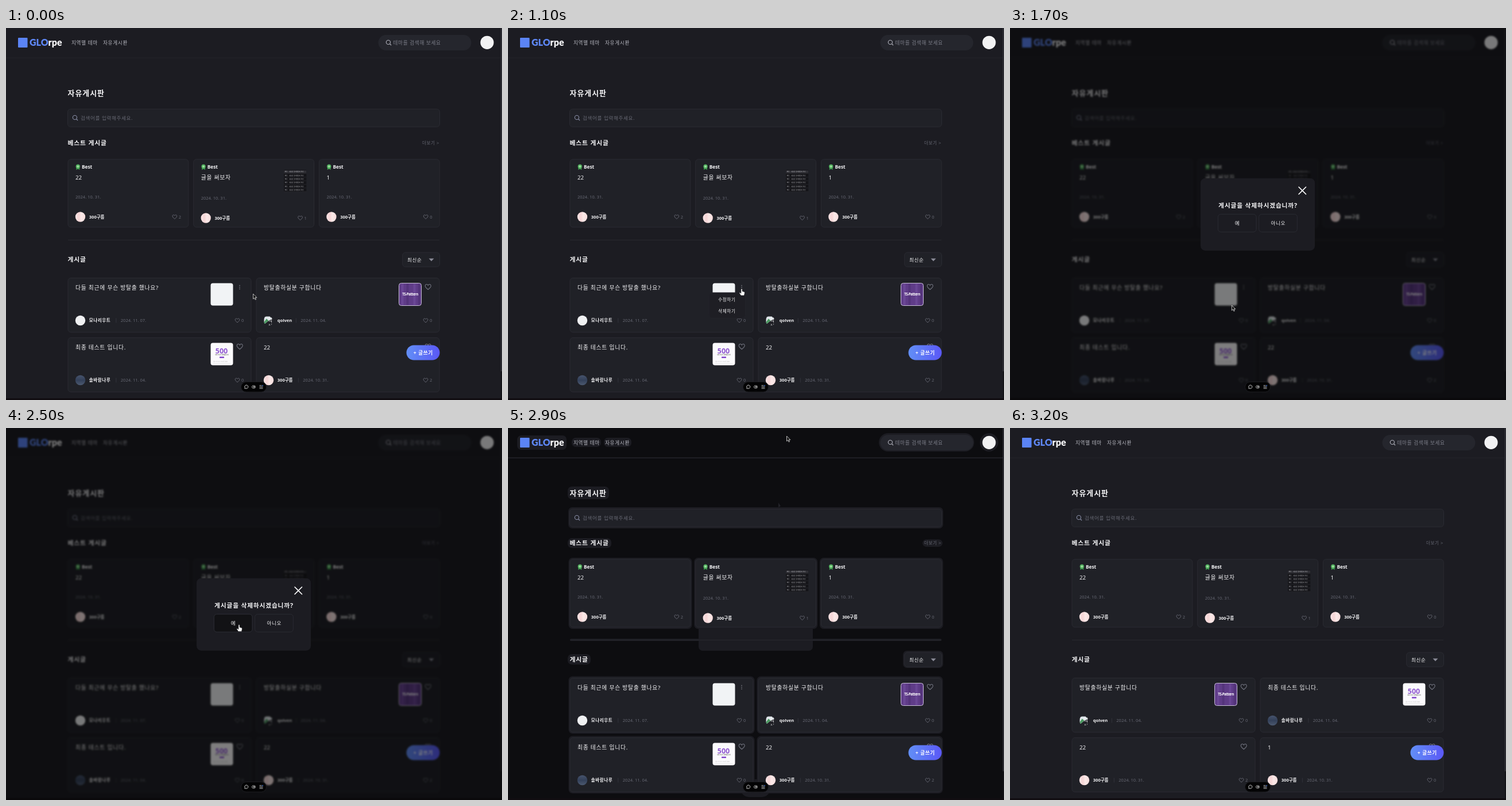
An HTML page for the animation above (3800 ms loop, 864x648 px).

```html
<!DOCTYPE html>
<html lang="ko">
<head>
<meta charset="utf-8">
<title>자유게시판</title>
<style>
  html, body { margin: 0; width: 100%; height: 100%; overflow: hidden; background: #0d0d10; }
  svg { display: block; width: 864px; height: 648px; }
  text { font-family: 'Noto Sans', 'Noto Sans CJK KR', 'Noto Sans CJK', sans-serif; white-space: pre; }
  .brand { font-family: Lato, sans-serif; }
  .dim { filter: blur(1.8px) brightness(.5); }
  .off { display: none; }
</style>
</head>
<body>
<svg id="stage" viewBox="0 0 864 648"></svg>
<script>
const BG = '#1c1c22', CARD = '#202127', EDGE = '#2a2b32', GREY = '#666873', WHITE = '#f4f4f6';
const LOOP = 3800;

const rect = (x, y, w, h, r, fill, more = '') =>
  `<rect x="${x}" y="${y}" width="${w}" height="${h}" rx="${r}" fill="${fill}" ${more}/>`;
const box = (x, y, w, h, r = 5, fill = CARD) => rect(x, y, w, h, r, fill, `stroke="${EDGE}"`);
const circle = (x, y, r, fill, more = '') => `<circle cx="${x}" cy="${y}" r="${r}" fill="${fill}" ${more}/>`;
const line = (d, color, width = 1, more = '') =>
  `<path d="${d}" fill="none" stroke="${color}" stroke-width="${width}" ${more}/>`;
const at = (x, y, body) => `<g transform="translate(${x} ${y})">${body}</g>`;
const group = (id, body) => `<g id="${id}">${body}</g>`;

// y is the vertical middle of the line; Hangul is set slightly open
function text(x, y, str, size, fill = WHITE, weight = 400, more = '') {
  const open = /[가-힣]/.test(str) && !/\d/.test(str) ? '.08em' : '0';
  return `<text x="${x}" y="${y + size * .37}" font-size="${size}" fill="${fill}" ` +
    `font-weight="${weight}" letter-spacing="${open}" ${more}>${str}</text>`;
}
const middle = 'text-anchor="middle"';

const heart = (x, y, w) => at(x, y, `<g transform="scale(${w / 10})">` +
  line('M0 4.4C-2.5 2.4-4.8.6-4.8-1.7C-4.8-4.6-1.4-5.2 0-2.7C1.4-5.2 4.8-4.6 4.8-1.7C4.8.6 2.5 2.4 0 4.4Z', '#757783', 1) + '</g>');
const lens = (x, y, color) => at(x, y, circle(-.6, -.6, 3.6, 'none', `stroke="${color}" stroke-width="1.1"`) +
  line('M2 2L4.6 4.6', color, 1.2));
const dots = (x, y) => [-3, 0, 3].map(d => circle(x, y + d, .8, '#8b8d98')).join('');

const USERS = {
  pink: { name: '300구름', width: 27.5, face: circle(0, 0, 8.7, 'url(#pink)') },
  runner: { name: '모나리우트', width: 38, face: circle(0, 0, 8.7, '#f0f1f3') },
  broken: {
    name: 'qolven', width: 23.5,
    face: '<g clip-path="url(#round)"><path d="M-8-7H2L6-3L-1 1L-8 7Z" fill="#dfe6ea"/>' +
      '<path d="M-8 3L-4-3L0 0L-8 7Z" fill="#4c9b62"/>' +
      text(-1.5, -1, '작', 9, WHITE) + text(-1.5, 10.5, '성', 9, WHITE) + '</g>'
  },
  slate: { name: '솔바람나루', width: 38, face: circle(0, 0, 8.7, 'url(#slate)') }
};

const THUMBS = {
  plain: rect(0, 0, 39, 39, 4, '#f1f3f5'),
  pattern: rect(0, 0, 39, 39, 4, '#5f3c88') +
    [4, 13, 25, 33].map((x, i) => rect(x, 1, 4, 37, 0, i % 2 ? '#54347b' : '#6b4796')).join('') +
    rect(0, 0, 39, 39, 4, 'none', 'stroke="#c9bfd8"') +
    text(19.5, 19, 'TS-Pattern', 6.2, '#fff', 700, middle + ' style="letter-spacing:-.5px"'),
  error: rect(0, 0, 39, 39, 4, '#fbfafc') + text(19, 13.5, '500', 12.5, '#8d55cf', 800, middle) +
    text(19.5, 20.5, '서버 오류가 발생했습니다', 2, '#555', 600, middle) +
    rect(15.5, 24, 8, 2.4, .6, '#8145cc') +
    text(5, 33, '잠시 후 다시 시도해 주세요', 2, '#aaa') +
    line('M4 36H35', '#ddd', .6)
};

const POSTS = [
  { title: '다들 최근에 무슨 방탈출 했나요?', user: 'runner', date: '2024. 11. 07.', likes: 0, thumb: 'plain', own: true },
  { title: '방탈출하실분 구합니다', user: 'broken', date: '2024. 11. 04.', likes: 0, thumb: 'pattern' },
  { title: '최종 테스트 입니다.', user: 'slate', date: '2024. 11. 04.', likes: 0, thumb: 'error' },
  { title: '22', user: 'pink', date: '2024. 10. 31.', likes: 2 },
  { title: '1', user: 'pink', date: '2024. 10. 31.', likes: 0 }
];
const SLOTS = [[108, 435.5], [436, 435.5], [108, 539.5], [436, 539.5]];
const BEST = [
  { x: 108, title: '22', likes: 2, drop: 0 },
  { x: 326.7, title: '글을 써보자', likes: 1, drop: 2, table: true },
  { x: 545.4, title: '1', likes: 0, drop: 0 }
];

function author(user, y) {
  const { name, face } = USERS[user];
  return at(21.5, y, face) + text(36.8, y, name, 7.5, WHITE, 600);
}
const likes = (right, y, n) => heart(right - 24, y, 8) + text(right - 17, y, n, 7.5, GREY);

function post({ title, user, date, likes: n, thumb, own }, [x, y]) {
  const end = 36.8 + USERS[user].width;
  return at(x, y, box(0, 0, 319, 94.5) + text(13, 17, title, 9.75, WHITE, 500) +
    (thumb ? at(248.5, 9, THUMBS[thumb]) : '') +
    (own ? dots(299, 16) : heart(299.2, 15.5, 10.5)) +
    author(user, 74) + line(`M${end + 9} 70V78`, '#34353d') +
    text(end + 17, 74, date, 7.5, GREY) + likes(319, 74, n));
}

function tableThumb() {
  const words = ['항목', '내용을 정리함', '결과 확인'];
  let out = rect(0, 0, 39, 38, 1, '#141418') + rect(0, 1, 39, 4.5, 0, '#303036');
  for (let row = 0; row < 6; row++) {
    const y = 3.3 + row * 6.3;
    words.forEach((word, i) => out += text([1.5, 9, 24][i], y, word, 2.4, '#c9c9ce', 500));
    out += line(`M0 ${y + 3}H39`, '#37373d', .5);
  }
  return out;
}

function best({ x, title, likes: n, drop, table }) {
  const ribbon = '<path d="M-2.6 1L-3 5.2L0 3.6L3 5.2L2.6 1Z" fill="#3f9b4f"/>' +
    circle(0, -.8, 3.6, '#55b562') + circle(0, -.8, 1.7, '#a7dfa6');
  return at(x, 228.7, box(0, 0, 209.8, 118.3) + at(17.3, 13.3, ribbon) +
    text(24, 13.3, 'Best', 8.3, WHITE, 700) + text(13, 32.2, title, 9.75, WHITE, 500) +
    text(13, 66 + drop, '2024. 10. 31.', 7.5, GREY) +
    (table ? at(157.5, 18.5, tableThumb()) : '') +
    author('pink', 100.3 + drop) + likes(209.8, 100.3 + drop, n));
}

// leftover patches of page colour around content while the backdrop is still dark
function patches() {
  const boxes = [
    [16, 13, 86, 25], [111, 17, 51, 16], [167, 17, 48, 16], [646, 9, 166, 32, 16], [822, 9, 32, 32, 16],
    [104, 102, 72, 22], [105, 138, 653, 37], [104, 192, 76, 17], [722, 194, 35, 13],
    [108, 367, 647, 4, 2], [332, 262, 199, 126], [104, 394, 40, 18], [688, 388, 70, 30],
    [405, 612, 52, 31, 15],
    ...BEST.map(b => [b.x - 2.5, 226, 215, 124]),
    ...SLOTS.map(([x, y]) => [x - 2.5, y - 3, 324, 100])
  ];
  const darkTop = rect(332, 255, 199, 93, 0, '#0d0d10');
  const [modal, rest] = [boxes[10], boxes.filter((_, i) => i !== 10)];
  const fill = ([x, y, w, h, r = 7]) => rect(x, y, w, h, r, BG);
  return rect(0, 0, 864, 648, 0, '#0d0d10') + line('M0 52H864', '#25262c') +
    fill(modal) + darkTop + rest.map(fill).join('') +
    `<path transform="translate(471 130)" d="M0 0V8L4 6Z" fill="#222228"/>`;
}

const header = line('M0 52H864', '#24252b') + rect(21, 17, 16.5, 17, 1, '#5b84f5') +
  `<text class="brand" x="41" y="31" font-size="16" font-weight="900" fill="#5f88f7">GLO<tspan fill="${WHITE}">rpe</tspan></text>` +
  text(114, 25.5, '지역별 테마', 8.6, '#b9bac2') + text(169, 25.5, '자유게시판', 8.6, '#b9bac2') +
  rect(648.5, 12, 162, 27, 13.5, '#25262d') + lens(666.5, 25.5, '#b3b4be') +
  text(674.5, 25.5, '테마를 검색해 보세요', 8.6, '#7d7f8a') + circle(838, 25.3, 11.6, '#f2f2f3');

const content = text(107.5, 113, '자유게시판', 12.9, WHITE, 700) +
  box(107.5, 141.2, 648, 31) + lens(120.5, 156.5, '#8a8fa8') +
  text(130, 156.5, '검색어를 입력해주세요.', 8.5, GREY) +
  text(107.5, 200.5, '베스트 게시글', 10.75, WHITE, 700) + text(725, 200.5, '더보기 &gt;', 7.5, GREY) +
  BEST.map(best).join('') + line('M108 369.3H755', '#2a2b31') +
  text(107.5, 403.5, '게시글', 10.75, WHITE, 700) +
  box(690.7, 391, 64.8, 25) + text(699, 403.5, '최신순', 8.5, WHITE, 500) +
  '<path d="M736.5 401.5H745.5L741 406.2Z" fill="#8b8c98"/>';

const list = start => SLOTS.map((slot, i) => post(POSTS[start + i], slot)).join('');
const writeButton = rect(697.5, 552.5, 58, 26, 13, 'url(#blue)') +
  text(726.8, 565.5, '+ 글쓰기', 8.6, '#fff', 700, middle);
const edges = rect(862, 0, 2, 648, 0, '#131317') + rect(862, 0, 1.4, 598, 0, '#3a3a41') +
  rect(0, 645, 864, 3, 0, '#110d11');

const menu = rect(350, 461, 63.5, 44.5, 6, '#1e1e24', 'stroke="#23232a"') +
  rect(351.5, 464, 60, 19.5, 5, '#131316', 'id="hoverEdit"') +
  rect(351.5, 484, 60, 19.5, 5, '#131316', 'id="hoverDelete"') +
  text(381.3, 473.5, '수정하기', 7.5, WHITE, 500, middle) + text(381.3, 493.5, '삭제하기', 7.5, WHITE, 500, middle);

const modal = rect(332, 261.7, 199, 126, 8, BG) +
  line('M503 277L515.5 289.5M515.5 277L503 289.5', '#fff', 1.6, 'stroke-linecap="round"') +
  text(432, 309, '게시글을 삭제하시겠습니까?', 10.7, WHITE, 700, middle) +
  box(362.3, 324.3, 66.7, 31, 5, BG) +
  rect(362.3, 324.3, 66.7, 31, 5, '#121215', `id="hoverYes" stroke="${EDGE}"`) +
  box(433.6, 324.3, 66.7, 31, 5, BG) +
  text(396, 340, '예', 8.5, WHITE, 500, middle) + text(467.3, 340, '아니오', 8.5, WHITE, 500, middle);

const toolbar = rect(409.5, 616.5, 44, 17.5, 8.7, '#030304', 'stroke="#1d1d21"') +
  line('M415.8 628L416.2 626.6A3 3 0 1 1 417.6 627.8Z', '#ddd', .9) +
  rect(428.5, 623, 6, 4.4, 2.2, 'none', 'stroke="#ccc" stroke-width=".9"') + circle(432, 625.2, 1.1, '#ddd') +
  line('M441.5 622.8H445.5M441.5 625.3H447.5M441.5 627.8H447.5', '#ddd', .9) + circle(447, 622.8, .9, '#4d8cff');

const cursors = `<path id="arrow" d="M0 0V9L2.1 7.1L3.6 10.3L5 9.7L3.6 6.6H6.4Z" fill="#111" stroke="#e6e6e6" stroke-width=".8"/>
  <path id="hand" d="M-1.1 1Q0-.8 1.1 1V4.6L4.4 5.5Q5.5 6 5.3 7.8L4.4 12H-1.2L-4 8Q-4.2 6.4-2.7 6.9L-1.1 8.2Z" fill="#fff" stroke="#17171a" stroke-width=".6"/>`;

const stops = (id, colors, more = '') => `<linearGradient id="${id}" ${more}>` +
  colors.map(([o, c]) => `<stop offset="${o}" stop-color="${c}"/>`).join('') + '</linearGradient>';

const $ = id => document.getElementById(id);
$('stage').innerHTML = '<defs>' +
  stops('blue', [[0, '#628ff6'], [1, '#5a58f6']]) +
  stops('pink', [[0, '#fbe6e6'], [.35, '#f6d5d6'], [.6, '#fbe9e8'], [1, '#f7dcdc']]) +
  stops('slate', [[0, '#46536c'], [.5, '#34415a'], [1, '#4c5970']], 'x2="0" y2="1"') +
  '<clipPath id="round"><circle r="8.7"/></clipPath></defs>' +
  group('page', rect(-20, -20, 904, 688, 0, BG) + group('stale', patches()) + header + content +
    group('before', list(0)) + group('after', list(1)) + writeButton + edges) +
  group('menu', menu) + group('modal', modal) + toolbar + group('cursor', cursors);

// time, scene, cursor, x, y, hovered item
const STEPS = [
  [0, 'page', 'arrow', 430.5, 463],
  [100, 'page', 'arrow', 426, 461],
  [200, 'page', 'arrow', 418, 456],
  [300, 'page', 'arrow', 411, 450],
  [400, 'page', 'hand', 408.5, 447.5],
  [600, 'page', 'hand', 408.5, 449.5],
  [1000, 'menu', 'hand', 408.5, 449.5],
  [1100, 'menu', 'hand', 407, 454],
  [1200, 'menu', 'hand', 402, 465, 'hoverEdit'],
  [1300, 'menu', 'hand', 395, 475, 'hoverEdit'],
  [1400, 'menu', 'hand', 388, 485, 'hoverDelete'],
  [1500, 'menu', 'hand', 384, 491, 'hoverDelete'],
  [1600, 'menu', 'hand', 383.5, 492.5, 'hoverDelete'],
  [1700, 'modal', 'arrow', 386.3, 483],
  [1800, 'modal', 'arrow', 389, 452],
  [1900, 'modal', 'arrow', 396, 408],
  [2000, 'modal', 'arrow', 405, 366],
  [2100, 'modal', 'hand', 411, 343.5, 'hoverYes'],
  [2200, 'modal', 'hand', 410, 343, 'hoverYes'],
  [2300, 'modal', 'hand', 408.5, 342.5, 'hoverYes'],
  [2400, 'modal', 'hand', 407, 342.5, 'hoverYes'],
  [2500, 'modal', 'hand', 406, 342.5, 'hoverYes'],
  [2700, 'modal', 'arrow', 437, 240],
  [2800, 'modal', 'arrow', 471, 130],
  [2900, 'stale', 'arrow', 485.5, 14],
  [3000, 'page'],
  [3100, 'after']
];

const show = (id, on) => $(id).classList.toggle('off', !on);
let shown;

function draw(step) {
  const [, scene, cursor, x = 0, y = 0, hover] = step;
  for (const id of ['menu', 'modal', 'stale', 'after']) show(id, scene === id);
  show('before', scene !== 'after');
  for (const id of ['arrow', 'hand']) show(id, cursor === id);
  for (const id of ['hoverEdit', 'hoverDelete', 'hoverYes']) show(id, hover === id);
  $('page').classList.toggle('dim', scene === 'modal');
  $('cursor').setAttribute('transform', `translate(${x} ${y})`);
}

const start = performance.now();
function tick() {
  const time = (performance.now() - start) % LOOP;
  const step = STEPS.findLast(([from]) => from <= time);
  if (step !== shown) draw(shown = step);
  requestAnimationFrame(tick);
}
tick();
</script>
</body>
</html>
```
